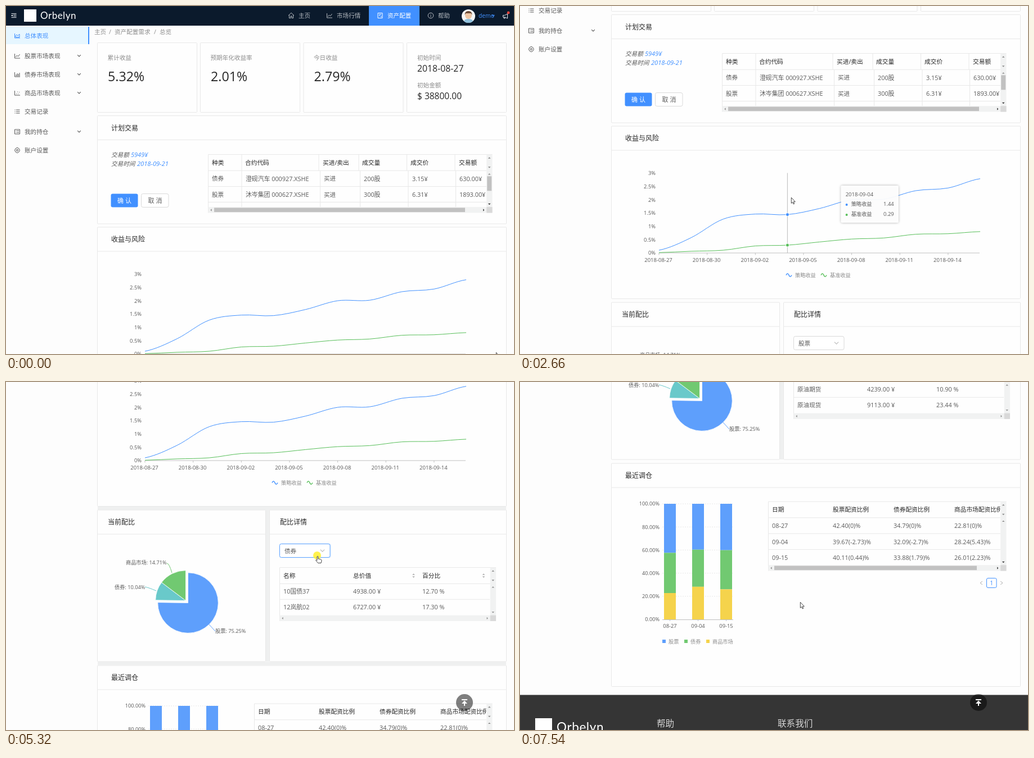
Animation, 903 px wide and 620 px high, one loop 8000 ms. Source, as an HTML page:

```html
<!DOCTYPE html>
<html lang="zh">
<head>
<meta charset="utf-8">
<title>资产配置</title>
<style>
  html, body { margin: 0; width: 100%; height: 100%; overflow: hidden; background: #fdfdfd; }
  svg { display: block; width: 100vw; height: 100vh; }
  text { font-family: "Open Sans", "Noto Sans CJK SC", "Noto Sans CJK", sans-serif; white-space: pre; }
  .brand { font-family: Lato, sans-serif; }
</style>
</head>
<body>
<svg id="stage" viewBox="0 0 903 620" preserveAspectRatio="none"></svg>
<script>
const LOOP = 8000;
const BLUE = '#4190ff', INK = '#262626', BODY = '#595959', PALE = '#8c8c8c', EDGE = '#e8e8e8';
const FILLS = { blue: '#5e9ffc', teal: '#69c9ca', green: '#71c971', yellow: '#f5d34c' };

// ---- drawing helpers ----
const rect = (x, y, w, h, fill, extra = '') =>
  `<rect x="${x}" y="${y}" width="${w}" height="${h}" fill="${fill}" ${extra}/>`;
const path = (d, stroke, extra = '') => `<path d="${d}" fill="none" stroke="${stroke}" ${extra}/>`;
const shape = (d, fill, extra = '') => `<path d="${d}" fill="${fill}" ${extra}/>`;
const circle = (x, y, r, fill, extra = '') => `<circle cx="${x}" cy="${y}" r="${r}" fill="${fill}" ${extra}/>`;
const group = (id, body, extra = '') => `<g id="${id}" ${extra}>${body}</g>`;
const text = (x, y, str, size = 10.6, fill = BODY, extra = '') =>
  `<text x="${x}" y="${y + size * .37}" font-size="${size}" fill="${fill}" ${extra}>${str}</text>`;
const cell = (x, y, str, fill = BODY) => text(x, y, str, /\d/.test(str) ? 10.85 : 10.6, fill);
const END = 'text-anchor="end"', MID = 'text-anchor="middle"';
const card = (x, y, w, h, title, tx) =>
  rect(x, y, w, h, '#fff', `fill-opacity=".75" stroke="${EDGE}" rx="1"`) +
  (title ? path(`M${x} ${y + 43}h${w}`, EDGE) + text(tx, y + 22, title, 12, INK) : '');
const caret = (x, y, dir, fill = '#888') => {
  const [w, h] = /[ud]/.test(dir) ? [2.3, dir === 'u' ? -2.3 : 2.3] : [0, 0];
  if (w) return shape(`M${x - w} ${y - h / 2}h${2 * w}l${-w} ${h}z`, fill);
  const s = dir === 'l' ? -2.2 : 2.2;
  return shape(`M${x - s / 2} ${y - 2.2}v4.4l${s} -2.2z`, fill);
};
const chevron = (x, y, color = BODY, r = 2.8) => path(`M${x - r} ${y - r / 2}l${r} ${r}l${r} ${-r}`, color, 'stroke-width="1.1"');

// Table frame with both scrollbars; rows are 28.2 high
function tableFrame(x, y, right, header, bottom, thumb, vthumb) {
  const inner = right - 10.3, bodyTop = y + 28.8;
  return rect(x, y, right - x, bottom - y, '#fff', 'fill-opacity=".7"') +
    path(`M${x} ${bottom}V${y}H${right}M${x} ${bodyTop}H${inner}`, EDGE) +
    rect(inner, y, 10.3, bottom - y, '#f1f2f2') +
    rect(x, bottom - 10.3, inner - x, 10.3, '#f1f2f2') +
    rect(inner, bottom - 10.3, 10.3, 10.3, '#d9d9d9') +
    (thumb ? rect(thumb[0], bottom - 9, thumb[1] - thumb[0], 7.6, '#c1c1c1') : '') +
    (vthumb ? rect(inner + 1, bodyTop + 10, 8, 26, '#c1c1c1') : '') +
    caret(x + 5, bottom - 5, 'l') + caret(inner - 5, bottom - 5, 'r', thumb ? '#333' : '#888') +
    caret(inner + 5, y + 6, 'u') + caret(inner + 5, y + 23, 'd') +
    caret(inner + 5, bodyTop + 6, 'u') + caret(inner + 5, bottom - 15.5, 'd', thumb ? '#333' : '#888') +
    header.map(([hx, s]) => text(hx, y + 14.4, s, 10.7, INK)).join('');
}

// ---- icons, centred on 0,0 ----
const ICONS = {
  area: 'M-4.5 -4V4H5M-3 2.5V0L-1 -2L1 0L4 -3V2.5Z',
  line: 'M-4.5 -4V4H5M-3 2L-.5 -1L1.5 1L4.5 -3',
  bars: 'M-4.5 -4V4H5M-2 3V0M0 3V-2M2 3V-1M4 3V-3',
  dots: 'M-4.5 -4V4H5M-2 1.5h1M0 -2h1M1 1.5h1M3 -1.5h1',
  list: 'M-4.5 -3h1.2M-4.5 0h1.2M-4.5 3h1.2M-2 -3H4.5M-2 0H4.5M-2 3H4.5',
  panel: 'M-4.5 -4H4.5V4H-4.5ZM-2.5 -1.5h1M-2.5 1.5h1M-.5 -1.5H3M-.5 1.5H3',
  gear: 'M-4.5 0L-3 -3L0 -4.8L3 -3L4.5 0L3 3L0 4.8L-3 3ZM-1.6 0A1.6 1.6 0 1 0 1.6 0A1.6 1.6 0 1 0 -1.6 0',
  home: 'M-5 0L0 -4.8L5 0M-3.6 -.8V4.5H-1V1H1V4.5H3.6V-.8',
  doc: 'M-4 -4.5H4V4.5H-4ZM-2 -2H2M-2 0H0M1 2H3',
  info: 'M-4.8 0A4.8 4.8 0 1 0 4.8 0A4.8 4.8 0 1 0 -4.8 0M0 -2.6v1M0 -.6v3.2',
  fold: 'M-4.5 -3.5H4.5M-1 -1.2H4.5M-1 1.2H4.5M-4.5 3.5H4.5M-4.5 0l2 -1.2v2.4z',
  horn: 'M-4.5 -1.5H-1.5L3.5 -4V4L-1.5 1.8H-4.5ZM-3 2V4H-1V2'
};
const icon = (name, x, y, color) => path(ICONS[name], color, `transform="translate(${x} ${y})"`);

// ---- page sections, in page coordinates ----
function header() {
  const nav = [['home', 507, '主页'], ['line', 575, '市场行情'], ['doc', 665, '资产配置'], ['info', 755, '帮助']];
  return rect(0, 0, 903, 35, '#0b1a2c') + icon('fold', 14, 17, '#dfe3e8') +
    rect(32, 6, 22, 22, '#fff') + text(61, 17, 'Orbelyn', 17, '#fff', 'class="brand" letter-spacing=".5"') +
    rect(645, 0, 90, 35, BLUE) +
    nav.map(([i, x, s]) => {
      const c = x === 665 ? '#fff' : '#b5bac0';
      return icon(i, x, 17, c) + text(x + 13, 17, s, 10.6, c);
    }).join('') +
    circle(822, 18, 12, '#f6f6f6') + shape('M814 27q1 -4 8 -4t8 4q-3 3 -8 3t-8 -3z', '#8fc0dd') +
    circle(822, 17, 6, '#edc5a4') + shape('M815.5 16q0 -7 6.500 -7t6.500 7l-2 -3h-9z', '#6b4a36') +
    text(840, 17, 'demo', 10.3, BLUE) + chevron(866, 17, BLUE, 2.4) +
    icon('horn', 888, 18, '#dfe3e8') + circle(893, 12, 2.4, '#f5453d');
}

function sidebar() {
  const items = [['area', 53, '总体表现'], ['line', 89, '股票市场表现', 1], ['bars', 122, '债券市场表现', 1],
    ['dots', 155, '商品市场表现', 1], ['list', 188, '交易记录'], ['panel', 224, '我的持仓', 1], ['gear', 257, '账户设置']];
  return rect(0, 37, 147, 31, '#e6f6ff') + rect(146, 37, 2, 31, BLUE) +
    items.map(([i, y, s, sub]) => {
      const c = y === 53 ? BLUE : BODY;
      return icon(i, 20, y, c) + text(33, y, s, 10.6, c) + (sub ? chevron(130, y - .5) : '');
    }).join('');
}

function summary() {
  const stats = [[162.5, '累计收益', '5.32%'], [345.5, '预期年化收益率', '2.01%'], [529, '今日收益', '2.79%']];
  return [[157, '主页'], [183, '/'], [193, '资产配置需求'], [263, '/'], [273, '总览']]
      .map(([x, s]) => text(x, 46, s, 10.6, PALE)).join('') +
    stats.map(([x, label, value]) => card(x, 65.5, 177, 124) +
      text(x + 18, 92, label, 10.6, PALE) + text(x + 18.5, 125, value, 23.2, INK)).join('') +
    card(712.5, 65.5, 177, 124) + text(731, 92, '初始时间', 10.6, PALE) + text(731, 111, '2018-08-27', 15.8, INK) +
    text(731, 141.500, '初始金额', 10.6, PALE) + text(731, 160, '$ 38800.00', 15.5, INK);
}

function plan() {
  const it = 'font-style="italic"';
  const head = [[366, '种类'], [425, '合约代码'], [563, '买进/卖出'], [633, '成交量'], [719, '成交价'], [805, '交易额']];
  const cols = [366, 426, 565, 636, 722, 806];
  const rows = [['债券', '澄砚汽车 000927.XSHE', '买进', '200股', '3.15¥', '630.00¥'],
    ['股票', '沐岑集团 000627.XSHE', '买进', '300股', '6.31¥', '1893.00¥']];
  return card(162.5, 195.5, 727, 192.5, '计划交易', 187) +
    text(187, 265, '交易额', 10.6, BODY, it) + text(222, 265, '5949¥', 11, BLUE, it) +
    text(187, 281, '交易时间', 10.6, BODY, it) + text(233, 281, '2018-09-21', 11.1, BLUE, it) +
    rect(186.5, 334.5, 48, 24, BLUE, 'rx="3"') + text(210.5, 347, '确 认', 11, '#fff', MID) +
    rect(240.5, 334.5, 48.5, 24, '#fff', 'rx="3" stroke="#d9d9d9"') + text(265, 347, '取 消', 11, BODY, MID) +
    tableFrame(359.5, 264.500, 864.5, head, 368.5, [370, 816], true) +
    rect(360, 293.5, 494, 28, '#e6f6ff', 'id="planRow0"') + rect(360, 322, 494, 28, '#e6f6ff', 'id="planRow1"') +
    path('M360 321.5H854M360 349.5H854M419 264V358M556 264V293M627 264V293M712.5 264V293M798 264V293' +
      'M558.5 293V358M629.5 293V358M715 293V358M799.5 293V358', EDGE) +
    rows.map((r, j) => r.map((s, i) => cell(cols[i], 307.500 + 28.4 * j, s)).join('')).join('');
}

// ---- line chart ----
const STEP = 57.1, X0 = 247, Y0 = 619.8, UNIT = 47.35;
const gains = [.1, .57, 1.27, 1.46, 1.44, 1.67, 2, 2.02, 2.34, 2.44, 2.79];
const base = [.01, .06, .1, .26, .29, .41, .52, .56, .7, .72, .8];
const px = i => X0 + STEP * i, py = v => Y0 - UNIT * v;
const dayLabel = n => new Date(Date.UTC(2018, 7, 27 + n)).toISOString().slice(0, 10);

function curve(values) {
  const at = i => py(values[Math.max(0, Math.min(values.length - 1, i))]);
  let d = `M${px(0)} ${at(0)}`;
  for (let i = 0; i < values.length - 1; i++) {
    const a = at(i) + (at(i + 1) - at(i - 1)) / 6, b = at(i + 1) - (at(i + 2) - at(i)) / 6;
    d += `C${px(i + 1 / 3)} ${a} ${px(i + 2 / 3)} ${b} ${px(i + 1)} ${at(i + 1)}`;
  }
  return d;
}

function lineChart() {
  let out = card(162.5, 394, 727, 307.5, '收益与风险', 187);
  for (let i = 0; i <= 6; i++) out += text(241, py(i / 2), i / 2 + '%', 9.4, BODY, END);
  for (let i = 0; i < 7; i++) {
    const x = X0 + 85.65 * i;
    out += path(`M${x} 620v3.5`, '#bfbfbf') + text(x - 1, 632, dayLabel(3 * i), 9.5, BODY, MID);
  }
  out += path('M247 620H817', '#bfbfbf') + path(curve(gains), BLUE) + path(curve(base), '#56be58');
  [[473, BLUE, '策略收益'], [535, '#56be58', '基准收益']].forEach(([x, c, s]) =>
    out += path(`M${x} 659.5c2 -4 4 -3 5 0s3 4 5 0`, c, 'stroke-width="1.5"') + text(x + 16, 659.500, s, 9.2, PALE));
  return out;
}

// ---- allocation ----
function slice(cx, cy, r, from, to, fill) {
  const p = a => `${cx + r * Math.sin(a * 2 * Math.PI)} ${cy - r * Math.cos(a * 2 * Math.PI)}`;
  return shape(`M${cx} ${cy}L${p(from)}A${r} ${r} 0 ${to - from > .5 ? 1 : 0} 1 ${p(to)}Z`, fill, 'stroke="#fff" stroke-width=".8"');
}

function pie() {
  return card(162.5, 708, 299, 270, '当前配比', 181) +
    slice(323.5, 873.5, 53.8, 0, .7525, FILLS.blue) +
    slice(319.5, 869.5, 53.8, .7525, .8529, FILLS.teal) + slice(319.5, 869.5, 53.8, .8529, 1, FILLS.green) +
    path('M286 803q4 0 9 17', FILLS.green) + path('M247 845q6 1 20 7', FILLS.teal) + path('M361 912l11 12', FILLS.blue) +
    text(213, 802, '商品市场: 14.71%', 9.2) + text(193, 846, '债券: 10.04%', 9.2) + text(372, 924, '股票: 75.25%', 9.2);
}

const HOLDINGS = [
  { name: '股票', rows: [['澜砚金融', '4416.00 ¥', '11.36 %'], ['砚岭湾区', '3540.00 ¥', '9.10 %'],
    ['栖禾地产', '4868.00 ¥', '12.52 %'], ['衡沐技术', '2730.00 ¥', '7.02 %']] },
  { name: '债券', rows: [['10国债37', '4938.00 ¥', '12.70 %'], ['12岚航02', '6727.00 ¥', '17.30 %']] },
  { name: '商品市场', rows: [['原油期货', '4239.00 ¥', '10.90 %'], ['原油现货', '9113.00 ¥', '23.44 %']] }
];

function holdingTable({ name, rows }, k) {
  const head = [[493, '名称'], [617, '总价值'], [740, '百分比']];
  const hover = k === 2 ? rect(487, 867.5, 373, 27.5, '#e6f6ff', 'id="holdRow"') : '';
  return group('hold' + k, text(495, 781, name) +
    tableFrame(486.5, 810.5, 871, head, 849.5 + 28.2 * rows.length, null, false) + hover +
    [724.5, 849].map(x => caret(x, 822.5, 'u', '#aaa') + caret(x, 827.5, 'd', '#aaa')).join('') +
    rows.map((r, j) => (j < rows.length - 1 ? path(`M487 ${867.3 + 28.2 * j}H860`, EDGE) : '') +
      r.map((s, i) => cell(head[i][0], 853.2 + 28.2 * j, s)).join('')).join(''));
}

function detail() {
  return card(468.5, 708, 421, 270, '配比详情', 487) +
    rect(485.500, 767.5, 92, 26, '#d5e8ff', 'id="glow" rx="4"') +
    rect(486.5, 768.5, 89.5, 24, '#fff', 'id="select" rx="3"') + chevron(562.5, 780.500, '#b5b5b5', 3.6) +
    HOLDINGS.map(holdingTable).join('');
}

function dropdown() {
  return group('menu', rect(486.5, 796, 90, 72, '#fff', 'rx="3" filter="url(#soft)"') +
    rect(486.5, 796, 90, 24, '#e6f6ff', 'id="option"') +
    HOLDINGS.map((h, i) => text(495, 808 + 24 * i, h.name)).join(''));
}

// ---- rebalancing ----
const MIXES = [['08-27', '42.40(0)%', '34.79(0)%', '22.81(0)%'],
  ['09-04', '39.67(-2.73)%', '32.09(-2.7)%', '28.24(5.43)%'], ['09-15', '40.11(0.44)%', '33.88(1.79)%', '26.01(2.23)%']];

function rebalance() {
  const bottom = 1263, per = 2.06, cols = [448, 556, 664, 772];
  let out = card(162.5, 985, 727, 397.500, '最近调仓', 187);
  for (let p = 0; p <= 100; p += 20) {
    out += text(248, bottom - p * per, p.toFixed(2) + '%', 9.2, BODY, END);
    if (p) out += path(`M253 ${bottom - p * per}H378`, EDGE, 'stroke-dasharray="2 2"');
  }
  MIXES.forEach(([day, ...parts], i) => {
    let y = bottom - 100 * per;
    parts.forEach((s, k) => {
      const h = parseFloat(s) * per;
      out += rect(256 + 50 * i, y, 21, h, [FILLS.blue, FILLS.green, FILLS.yellow][k]);
      y += h;
    });
    out += path(`M${266.5 + 50 * i} 1263v3`, '#bfbfbf') + text(266.5 + 50 * i, 1275, day, 9.4, BODY, MID);
  });
  out += path('M253 1263.5H379', '#bfbfbf');
  [[253, 'blue', '股票'], [292, 'green', '债券'], [331, 'yellow', '商品市场']].forEach(([x, c, s]) =>
    out += rect(x, 1299, 6, 6, FILLS[c]) + text(x + 11, 1302.5, s, 9.2, PALE));
  out += tableFrame(441.5, 1053, 864.5, ['日期', '股票配资比例', '债券配资比例'].map((s, i) => [cols[i], s]), 1176.500, [452, 812], false) +
    `<g clip-path="url(#lastCol)">${text(772, 1067.4, '商品市场配资比例', 10.7, INK)}</g>` +
    path('M442 1110H854M442 1138.5H854', EDGE) +
    MIXES.map((r, j) => r.map((s, i) => cell(cols[i], 1096.2 + 28.3 * j, s)).join('')).join('');
  return out + path('M822 1195l-4 3l4 3M854 1195l4 3l-4 3', '#b0b0b0') +
    rect(829.500, 1189.5, 17.5, 17, '#fff', `rx="2.500" stroke="${BLUE}"`) + text(838.2, 1198, '1', 10.6, BLUE, MID);
}

const footer = () => rect(0, 1397.5, 903, 160, '#353535') + rect(27, 1439, 30, 30, '#fff') +
  text(65, 1454.5, 'Orbelyn', 22.5, '#fff', 'class="brand" letter-spacing=".6"') +
  text(243, 1448, '帮助', 15.6, '#d6d6d6') + text(458, 1448, '联系我们', 15.6, '#d6d6d6');

function tooltip() {
  return group('cross', path('M0 477.5V620', '#bbb') + circle(0, 0, 3, BLUE, 'id="dot0" stroke="#fff"') +
      circle(0, 0, 3, '#56be58', 'id="dot1" stroke="#fff"')) +
    group('tip', rect(0, 0, 102, 66, '#fff', 'rx="2" fill-opacity=".93" filter="url(#soft)"') +
      text(8, 15, '', 9.5, BODY, 'id="tipDay"') +
      ['策略收益', '基准收益'].map((s, i) => circle(10, 34 + 18 * i, 2, i ? '#56be58' : BLUE) +
        text(18, 33 + 18 * i, s, 9.2) + text(94, 33 + 18 * i, '', 9.4, BODY, `id="tipVal${i}" ${END}`)).join(''));
}

function pointers() {
  const line = 'stroke="#333" stroke-width=".9" stroke-linejoin="round"';
  return circle(0, 0, 7, '#fff02e', 'id="click" opacity=".85"') + group('cursor',
    shape('M.3 .3V10.5L2.600 8.4L4.1 12L5.7 11.3L4.2 7.8H7.3Z', '#fff', `id="arrow" ${line}`) +
    shape('M0 1q1.300 -1.500 2 .2V5l4.5 1q1.700 .5 1.500 2.5L7 12.500H1.500L-2.500 7.500q.5 -1.500 2.500 .3Z', '#fff', `id="hand" ${line}`) +
    path('M-2.500 -5H-.7L0 -4.400L.7 -5H2.500M0 -4.400V4.400M-2.500 5H-.7L0 4.400L.7 5H2.500', '#333', 'id="ibeam"'));
}

document.getElementById('stage').innerHTML = `<defs>
  <filter id="soft" x="-20%" y="-20%" width="140%" height="140%"><feDropShadow dx="0" dy="0" stdDeviation="2" flood-opacity=".35"/></filter>
  <clipPath id="lastCol"><rect x="770" y="1050" width="84" height="30"/></clipPath></defs>` +
  rect(0, 0, 903, 620, '#fdfdfd') +
  group('page', group('gaps', rect(163, 702, 726, 6, '#eff0f0', 'class="band"') +
      rect(163, 978.5, 726, 6, '#eff0f0', 'class="band"') + rect(462, 708, 6, 270, '#eff0f0')) +
    header() + sidebar() + summary() + plan() + lineChart() + pie() + detail() + rebalance() + footer() + tooltip() + dropdown()) +
  group('toTop', circle(815, 571, 15, '#000', 'fill-opacity=".5"') +
    path('M810 566H820M815 577V569', '#fff', 'stroke-width="2"') + shape('M810 573L815 567.5L820 573Z', '#fff')) +
  pointers();

// ---- motion ----
const $ = id => document.getElementById(id);
const show = (id, on) => $(id).setAttribute('visibility', on ? 'visible' : 'hidden');
const move = (id, x, y) => $(id).setAttribute('transform', `translate(${x} ${y})`);
const clamp = v => Math.max(0, Math.min(1, v));
const between = (t, a, b) => t >= a && t < b;

const WHEEL = [720, 1000, 1380, 2740, 2830, 3060, 3250, 3450, 5930, 6150, 6390, 6598, 6800, 7200];
const scrollAt = t => WHEEL.reduce((sum, at) => sum + 30 * (1 - Math.cos(Math.PI * clamp((t - at) / 167))), 0);

const TRACK = [[40, 871, 617], [300, 620, 300], [490, 440, 117], [690, 440, 117], [900, 319, 262], [1600, 319, 262],
  [1800, 400, 302], [2150, 640, 345], [2250, 640, 345], [2460, 551, 341], [2660, 482, 341], [3870, 478, 354], [3940, 477, 356],
  [4200, 530, 301], [4350, 530, 301], [4600, 525, 352], [4760, 525, 352], [5000, 560, 332], [5280, 553, 310],
  [5400, 553, 310], [5560, 525, 376], [5640, 525, 376], [5740, 495, 400], [7400, 495, 400], [7401, 498, 392]];

function cursorAt(t) {
  const i = TRACK.findIndex(k => k[0] > t);
  if (i === 0) return TRACK[0].slice(1);
  if (i < 0) return TRACK[TRACK.length - 1].slice(1);
  const [t0, x0, y0] = TRACK[i - 1], [t1, x1, y1] = TRACK[i], u = (t - t0) / (t1 - t0);
  return [x0 + (x1 - x0) * u, y0 + (y1 - y0) * u];
}

const CLICKS = [4250, 4710, 5310, 5630];
const MENUS = [[4260, 4720], [5360, 5640]];

function updateTooltip(t, x, pageY) {
  const on = between(t, 1600, 3000) && x > X0 && x < 817 && pageY > 478 && pageY < 625;
  ['cross', 'tip'].forEach(id => show(id, on));
  if (!on) return;
  const i = Math.round((x - X0) / STEP), past = Math.max(1700, t - 200), [lx, ly] = cursorAt(past);
  move('cross', px(i), 0);
  move('tip', lx + 20, ly + scrollAt(past) - 21);
  $('tipDay').textContent = dayLabel(2 * i);
  [gains, base].forEach((v, k) => {
    $('dot' + k).setAttribute('cy', py(v[i]));
    $('tipVal' + k).textContent = v[i];
  });
}

function render(t) {
  const scroll = scrollAt(t), [x, y] = cursorAt(t), pageY = y + scroll;
  move('page', 0, -scroll);
  show('toTop', scroll > 300.5);
  show('gaps', t >= 2990);
  document.querySelectorAll('.band').forEach(b => b.setAttribute('opacity', t < 7200 ? 1 : 0));

  [0, 1].forEach(i => show('planRow' + i, t < 690 && x > 360 && x < 854 && between(pageY, 293.5 + 28.4 * i, 321.9 + 28.4 * i)));
  updateTooltip(t, x, pageY);

  const choice = t < 4720 ? 0 : t < 5640 ? 1 : 2;
  HOLDINGS.forEach((_, k) => $('hold' + k).setAttribute('display', k === choice ? 'inline' : 'none'));
  show('holdRow', between(t, 5700, 6750));
  show('glow', t >= 4250);
  $('select').setAttribute('stroke', t >= 4250 ? '#64a7ff' : '#d9d9d9');

  const open = MENUS.find(([a, b]) => between(t, a, b));
  show('menu', open);
  if (open) {
    $('menu').setAttribute('opacity', clamp((t - open[0]) / 120));
    const hovered = Math.floor((pageY - 796) / 24);
    $('option').setAttribute('y', 796 + 24 * (between(hovered, 0, 3) ? hovered : choice));
  }

  const kind = between(t, 4150, 5680) ? 'hand' : between(t, 5730, 7390) ? 'ibeam' : between(t, 7390, 7540) ? '' : 'arrow';
  ['arrow', 'hand', 'ibeam'].forEach(id => show(id, id === kind));
  move('cursor', x, y);
  show('click', CLICKS.some(c => between(t, c, c + 130)));
  move('click', x, y - 1);
}

const start = performance.now();
function tick() {
  render((performance.now() - start) % LOOP);
  requestAnimationFrame(tick);
}
tick();
</script>
</body>
</html>
```
